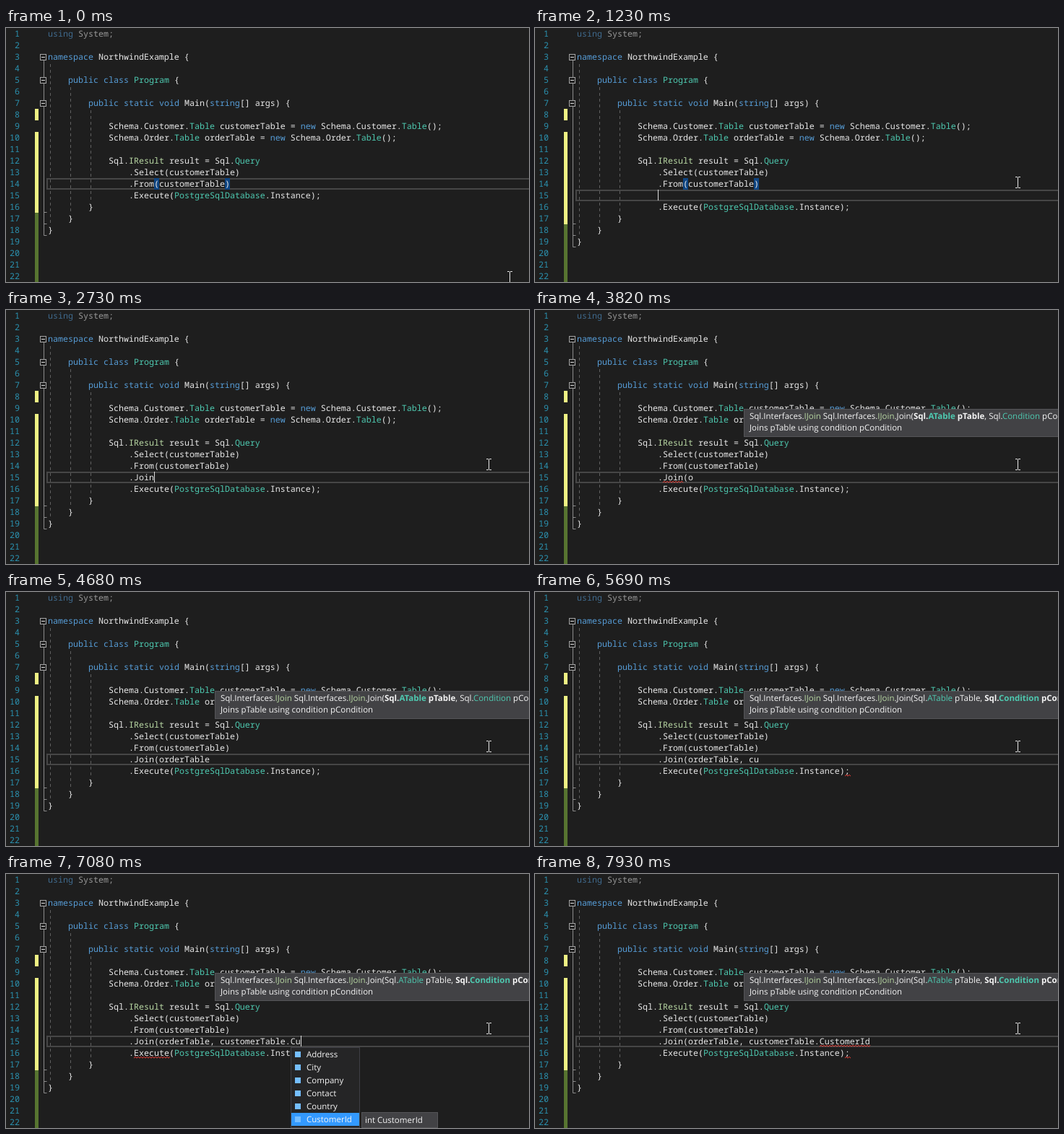
An HTML page that plays this animation: 724x352 px, repeating every 8 s.

```html
<!DOCTYPE html>
<html lang="en">
<head>
<meta charset="utf-8">
<title>Typing a join in a code editor</title>
<style>
html, body { margin: 0; width: 100%; height: 100%; overflow: hidden; background: #1e1e1e; }
svg { display: block; width: 724px; height: 352px; }
text { white-space: pre; fill: #e8e8e8; text-rendering: geometricPrecision; }
.code { font: 11.667px "Noto Sans Mono", "DejaVu Sans Mono", monospace; }
.ui { font: 11.5px "Open Sans", "Noto Sans", sans-serif; fill: #f4f4f4; }
.num { fill: #2b91af; text-anchor: end; }
.key { fill: #569cd6; }
.type { fill: #4ec9b0; }
.face { fill: #b8d7a3; }
.bold { font-weight: 700; }
.faded { opacity: .6; }
</style>
</head>
<body>
<svg id="stage" viewBox="0 0 724 352"></svg>
<script>
const LOOP = 8000, ROW = 16, CHAR = 7, LEFT = 58;
const stage = document.getElementById('stage');

const head = [
  'using System;', '', 'namespace NorthwindExample {', '',
  '    public class Program {', '',
  '        public static void Main(string[] args) {', '',
  '            Schema.Customer.Table customerTable = new Schema.Customer.Table();',
  '            Schema.Order.Table orderTable = new Schema.Order.Table();', '',
  '            Sql.IResult result = Sql.Query',
  '                .Select(customerTable)',
  '                .From(customerTable)'
];
const tail = [
  '                .Execute(PostgreSqlDatabase.Instance);',
  '        }', '    }', '}'
];

const members = {
  x: 177, mid: 362, right: 362, bottom: 352, sel: -1, icon: '#b180d7',
  items: ['Equals', 'Execute', 'GetHashCode', 'GetType', 'Join', 'JoinIf', 'LeftJoin']
};
const orders = {
  x: 212, mid: 326, right: 492, bottom: 331, sel: 2, icon: '#75beff',
  items: ['object', 'Object', 'orderTable', 'Order', 'out'], note: '(local) Table orderTable'
};
const customers = {
  x: 296, mid: 416, right: 588, bottom: 352, sel: 1, icon: '#75beff',
  items: ['Customer', 'customerTable', 'char', 'checked', 'class', 'const', 'Console'],
  note: '(local) Table customerTable'
};
const columns = {
  x: 394, mid: 490, right: 598, bottom: 352, sel: -1, icon: '#75beff',
  items: ['Address', 'City', 'Company', 'Contact', 'Country', 'CustomerId', 'Equals'],
  note: 'int CustomerId'
};

const JOIN = '.Join(orderTable', BOTH = JOIN + ', customerTable';

// Each entry changes part of the editor state from its time on.
const steps = [
  [0, { typed: null, caret: false, mouse: [697, 345], braces: true, list: null, tip: null,
        joinBad: false, endBad: false, execBad: false, idBad: false }],
  [70, { mouse: [686, 290] }],
  [150, { mouse: [668, 214] }],
  [230, { mouse: [674, 217] }],
  [450, { mouse: [671, 209], caret: true }],
  [550, { mouse: [668, 214] }],
  [1000, { caret: false }],
  [1230, { typed: '', caret: true }],
  [1410, { braces: false }],
  [1730, { typed: '.' }],
  [1800, { list: members }],
  [2190, { typed: '.J', list: { ...members, sel: 4 } }],
  [2260, { typed: '.Jo', caret: false }],
  [2480, { typed: '.Join', list: null }],
  [2730, { caret: true }],
  [3260, { caret: false }],
  [3350, { typed: '.Join(' }],
  [3430, { tip: { x: 212, y: 243, arg: 0 } }],
  [3600, { joinBad: true }],
  [3820, { typed: '.Join(o', tip: { x: 289, y: 137, arg: 0 } }],
  [3900, { caret: true }],
  [4130, { list: orders }],
  [4200, { joinBad: false }],
  [4280, { caret: false }],
  [4680, { typed: JOIN, list: null }],
  [4840, { caret: true, endBad: true }],
  [5150, { typed: JOIN + ',' }],
  [5220, { typed: JOIN + ', ', tip: { x: 289, y: 137, arg: 1 } }],
  [5440, { caret: false }],
  [5610, { typed: JOIN + ', c' }],
  [5690, { typed: JOIN + ', cu' }],
  [5760, { list: customers }],
  [5840, { list: { ...customers, bottom: 311, items: ['Customer', 'customerTable', 'Custom'] } }],
  [5920, { execBad: true }],
  [5990, { caret: true }],
  [6240, { typed: BOTH, list: null }],
  [6470, { typed: BOTH + '.', caret: false }],
  [6600, { list: columns }],
  [6930, { typed: BOTH + '.C', list: { ...columns, sel: 5 } }],
  [7000, { typed: BOTH + '.Cu', caret: true }],
  [7160, { list: { ...columns, bottom: 293, sel: 0, items: ['CustomerId'] } }],
  [7380, { execBad: false }],
  [7480, { caret: false }],
  [7780, { typed: BOTH + '.CustomerId', list: null }],
  [7930, { idBad: true }]
];

const groups = {
  key: /^(using|namespace|public|class|static|void|string|new)$/,
  type: /^(Program|Table|Query|PostgreSqlDatabase|ATable|Condition)$/,
  face: /^(IResult|IJoin)$/
};
const paint = s => s.replace(/\w+/g, word => {
  const name = Object.keys(groups).find(g => groups[g].test(word));
  return name ? `<tspan class="${name}">${word}</tspan>` : word;
});
const text = (x, y, cls, s) => `<text x="${x}" y="${y}" class="${cls}">${s}</text>`;
const rect = (x, y, w, h, fill, more = '') =>
  `<rect x="${x}" y="${y}" width="${w}" height="${h}" fill="${fill}" ${more}/>`;
const path = (d, stroke, more = '') => `<path d="${d}" fill="none" stroke="${stroke}" ${more}/>`;
const frame = (x, y, w, h, fill, stroke) =>
  rect(x + .5, y + .5, w - 1, h - 1, fill, `stroke="${stroke}"`);

function codeLine(s, i) {
  const indent = s.search(/\S|$/);
  return text(LEFT + indent * CHAR, i * ROW + 12, i ? 'code' : 'code faded', paint(s.slice(indent)));
}

function squiggle(x, end, row) {
  let d = `M${x} ${row * ROW - .8}`;
  for (let i = 0; x + i * 2 < end; i++) d += `l2 ${i % 2 ? 2 : -2}`;
  return path(d, '#fc3e36');
}

function margin(shift) {
  const end = 287.5 + shift;
  let out = rect(40, 112, 5, 16, '#eff284') + rect(40, 144, 5, 112 + shift, '#eff284') +
    rect(40, 256 + shift, 5, 96, '#577430');
  for (let n = 1; n <= 22; n++) out += text(19, n * ROW - 4, 'code num', n);
  out += path(`M52.5 45V${end}M52.5 ${end}h4M52.5 ${end - 16}h4M52.5 ${end - 32}h4`, '#8c8c8c');
  for (let i = 0; i < 3; i++) {
    const y = 36 + i * 32;
    out += frame(47, y, 9, 9, '#1e1e1e', '#a5a5a5') + path(`M49 ${y + 4.5}h5`, '#dcdcdc');
    out += path(`M${61.5 + i * 28} ${50 + i * 32}V${272 - i * 16 + shift}`, '#606060', 'stroke-dasharray="4 4"');
  }
  return out;
}

function signature({ x, y, arg }) {
  const args = ['Sql.ATable pTable', 'Sql.Condition pCondition)'].map((s, i) =>
    `<tspan class="${i === arg ? 'bold' : ''}">${paint(s)}</tspan>`);
  const call = paint('Sql.Interfaces.IJoin Sql.Interfaces.IJoin.Join(');
  return frame(x, y, 600, 39, '#424245', '#555558') +
    text(x + 8, y + 14, 'ui', call + args.join(', ')) +
    text(x + 8, y + 29.5, 'ui', 'Joins pTable using condition pCondition');
}

function popup({ x, mid, right, bottom, sel, icon, items, note }) {
  const top = 240, shown = items.slice(0, Math.floor((bottom - top) / 18));
  let out = frame(x, top, mid - x, bottom - top, '#252526', '#3f3f46');
  shown.forEach((s, i) => {
    const y = top + 1 + i * 18;
    if (i === sel) out += rect(x + 1, y, mid - x - 2, 18, '#3399ff');
    out += rect(x + 6, y + 5, 8, 8, icon) + text(x + 22, y + 13, 'ui', s);
  });
  if (note && sel >= 0) {
    out += frame(mid + 2, top + sel * 18, right - mid - 2, 22, '#424245', '#555558') +
      text(mid + 7, top + sel * 18 + 15, 'ui', note);
  }
  return out;
}

function ibeam([x, y]) {
  return path(`M${x - 3} ${y - 7.5}h3m1 0h3M${x + .5} ${y - 7}v14M${x - 3} ${y + 7.5}h3m1 0h3`, '#e8e8e8');
}

function draw(s) {
  const added = s.typed !== null, row = added ? 14 : 13, y = row * ROW;
  const lines = added ? [...head, ' '.repeat(16) + s.typed, ...tail] : [...head, ...tail];
  const caretX = added ? 170 + s.typed.length * CHAR : 310;
  let out = rect(0, 0, 724, 352, '#1e1e1e');
  out += rect(57, y + 1, 700, 14, 'none', 'stroke="#464646" stroke-width="2"');
  out += margin(added ? ROW : 0);
  if (s.braces) out += rect(205, 208, 7, 16, '#0e4583') + rect(303, 208, 7, 16, '#0e4583');
  out += lines.map(codeLine).join('');
  if (s.joinBad) out += squiggle(177, 205, 15);
  if (s.idBad) out += squiggle(394, 464, 15);
  if (s.execBad) out += squiggle(177, 226, 16);
  if (s.endBad) out += squiggle(429, 436, 16);
  if (s.caret) out += rect(caretX, y, 1, 15, '#dcdcdc');
  if (s.tip) out += signature(s.tip);
  if (s.list) out += popup(s.list);
  stage.innerHTML = out + ibeam(s.mouse);
}

let last = 0;
function tick() {
  const t = performance.now() % LOOP;
  const count = steps.filter(([at]) => at <= t).length;
  if (count !== last) {
    draw(Object.assign({}, ...steps.slice(0, count).map(step => step[1])));
    last = count;
  }
  requestAnimationFrame(tick);
}
tick();
</script>
</body>
</html>
```
